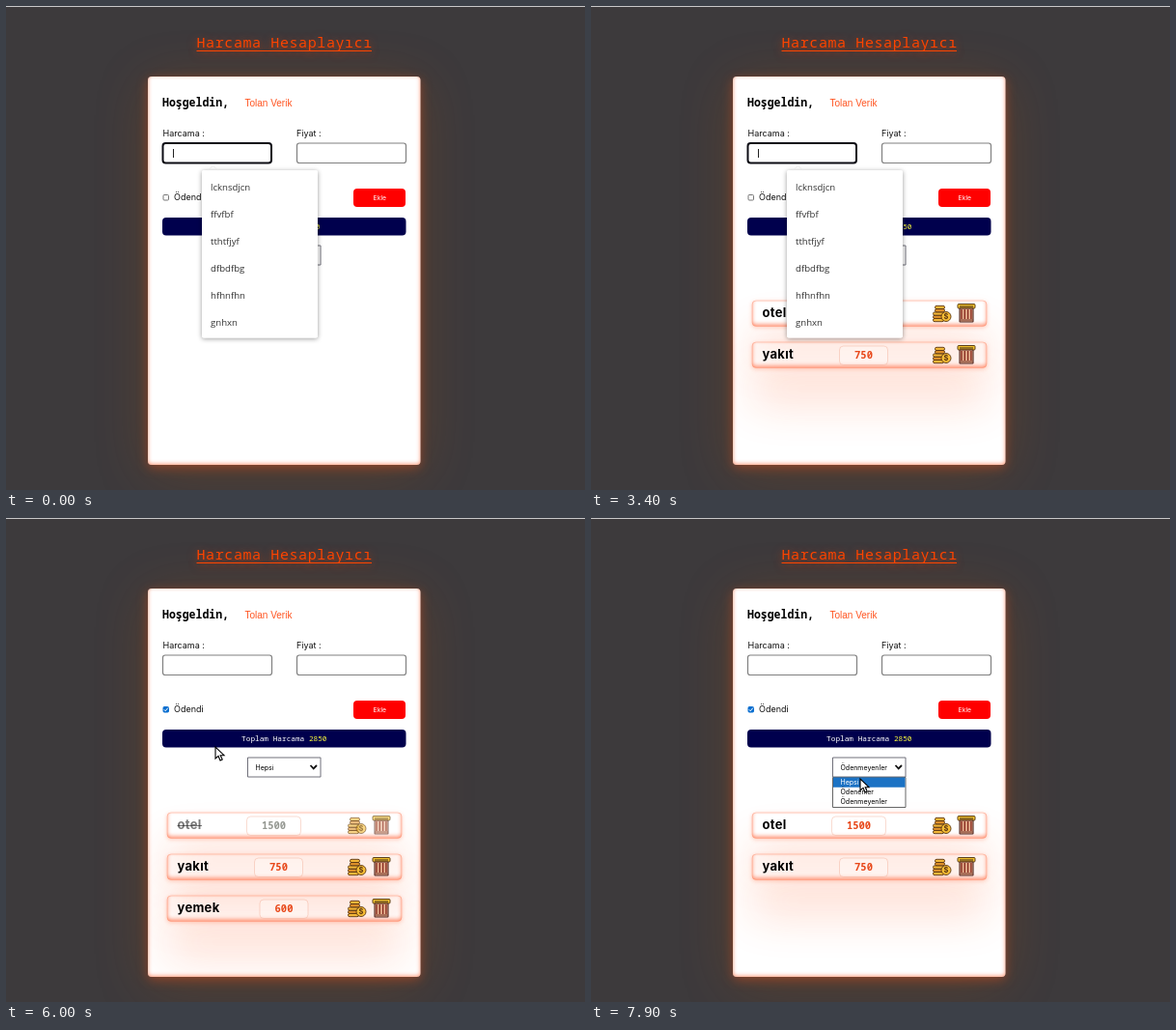
These frames come from a looping animation (600x501 px, 8000 ms). An HTML page with a canvas:

```html
<!DOCTYPE html>
<html lang="tr">
<head>
<meta charset="utf-8">
<title>Harcama Hesaplayıcı</title>
<style>
  html, body { margin: 0; width: 100%; height: 100%; overflow: hidden; background: #3d3a3c; }
  canvas { display: block; }
</style>
</head>
<body>
<canvas id="stage" width="600" height="501"></canvas>
<script>
const c = document.getElementById('stage').getContext('2d');
const LOOP = 8000;
const MONO = '"Noto Sans Mono", "DejaVu Sans Mono", monospace';
const SANS = 'Inter, "Open Sans", sans-serif';
const ORANGE = '#ff4500';
const FILTERS = ['Hepsi', 'Ödenenler', 'Ödenmeyenler'];
const HINTS = ['lcknsdjcn', 'ffvfbf', 'tthtfjyf', 'dfbdfbg', 'hfhnfhn', 'gnhxn'];
// start = moment the first letter is typed
const ENTRIES = [
  { name: 'otel', price: 1500, start: 300, mid: 277.5 },
  { name: 'yakıt', price: 750, start: 1950, mid: 282.5 },
  { name: 'yemek', price: 600, start: 3600, mid: 288 }
];

// Pointer path: time, x, y, and whether it hides until the next stop
const path = [];
for (const { start } of ENTRIES) {
  path.push([start + 900, 405, 153], [start + 1100, 395, 197],
            [start + 1250, 395, 197], [start + 1380, 209, 153, true]);
}
path.splice(-2);
path.push(
  [5050, 395, 197], [5300, 364, 318], [5400, 364, 318], [5650, 166, 199], [5800, 166, 199],
  [6000, 217, 237], [6200, 364, 318], [6280, 364, 318], [6390, 364, 404], [6450, 364, 404],
  [6600, 290, 258], [6680, 290, 258], [6860, 285, 283], [7000, 287, 281], [7200, 290, 258],
  [7280, 290, 258], [7450, 280, 293], [7520, 280, 293], [7680, 290, 258], [7760, 290, 258],
  [7900, 279, 270], [8000, 279, 270]);

function pointer(t) {
  const i = path.findIndex((p, k) => t >= p[0] && k + 1 < path.length && t < path[k + 1][0]);
  if (i < 0 || path[i][3]) return null;
  const [a, x, y] = path[i], [b, x2, y2] = path[i + 1];
  const k = (t - a) / (b - a), e = k * k * (3 - 2 * k);
  return { x: x + (x2 - x) * e, y: y + (y2 - y) * e };
}

const typed = (text, time, step) => String(text).slice(0, Math.max(0, Math.floor(time / step) + 1));

function stateAt(t) {
  const s = { name: '', price: '', focus: '', popup: false, cards: [], filter: 0 };
  ENTRIES.forEach((e, i) => {
    const u = t - e.start;
    if (u >= 1200) s.cards.push({ ...e, paid: false });
    else if (u >= (i ? -270 : -300)) {
      s.name = typed(e.name, u, 80);
      s.price = typed(e.price, u - 600, 90);
      s.focus = u >= 450 ? 'price' : 'name';
      s.popup = u < 0;
    }
  });
  s.total = s.cards.reduce((sum, e) => sum + e.price, 0);
  if (s.cards[0]) s.cards[0].paid = t >= 5350 && t < 6250;
  if (s.cards[2]) s.cards[2].paid = t >= 6420;
  s.checked = t >= 5750;
  s.open = (t >= 6640 && t < 6900) || (t >= 7240 && t < 7490) || t >= 7720;
  s.selected = t >= 6640;
  s.filter = t >= 7490 ? 2 : t >= 6900 ? 1 : 0;
  s.cards = s.cards.filter(e => !s.filter || e.paid === (s.filter === 1));
  s.mouse = pointer(t);
  return s;
}

function text(str, x, y, font, color, spacing = 0, align = 'left') {
  c.font = font;
  c.letterSpacing = spacing + 'px';
  c.textAlign = align;
  c.fillStyle = color;
  c.fillText(str, x, y);
}

function box(x, y, w, h, r, fill, stroke, line = 1) {
  c.beginPath();
  c.roundRect(x, y, w, h, r);
  if (fill) { c.fillStyle = fill; c.fill(); }
  if (stroke) { c.strokeStyle = stroke; c.lineWidth = line; c.stroke(); }
}

// Shadow alone, outside or inside a rounded box
function shadow([x, y, w, h, r], dy, blur, color, inside) {
  c.save();
  c.beginPath();
  if (!inside) c.rect(0, 0, 600, 501);
  c.roundRect(x, y, w, h, r);
  c.clip('evenodd');
  c.shadowColor = color;
  c.shadowBlur = blur;
  c.shadowOffsetX = 2000;
  c.shadowOffsetY = dy;
  c.fillStyle = '#000';
  c.beginPath();
  if (inside) c.rect(x - 2100, y - 100, w + 200, h + 200);
  c.roundRect(x - 2000, y, w, h, r);
  c.fill('evenodd');
  c.restore();
}

function line(points, color, width) {
  c.beginPath();
  points.forEach(p => c.lineTo(...p));
  c.strokeStyle = color;
  c.lineWidth = width;
  c.stroke();
}

function input(x, value, focused) {
  if (focused) box(x + .5, 142, 112.5, 20.5, 3, '#fff', '#0c0c14', 2);
  else box(x + .5, 142, 113, 20.5, 2.5, '#fff', '#808080', 1.2);
  text(value, x + 11, 155, '7px ' + SANS, '#111');
  if (focused) {
    const end = x + 11.5 + c.measureText(value).width;
    line([[end, 148], [end, 157]], '#222', 1);
  }
}

function coins(x, y) {
  const edge = '#5a3510';
  for (let i = 0; i < 5; i++) {
    box(x + (i < 3 ? 0 : 2), y + 14.5 - i * 3.3, i < 3 ? 11 : 10, 3.2, 1.5, i % 2 ? '#e2932b' : '#f3b738', edge, .9);
  }
  c.beginPath();
  c.arc(x + 13.5, y + 12.5, 5, 0, 7);
  c.fillStyle = '#f6bd35';
  c.fill();
  c.strokeStyle = edge;
  c.stroke();
  text('$', x + 13.5, y + 15.2, 'bold 7.5px ' + SANS, edge, 0, 'center');
}

function cashMachine(x, y) {
  box(x + .5, y + .5, 18, 4.5, 1, '#f0c02e', '#5d4018', 1);
  line([[x + 2.5, y + 3], [x + 16.5, y + 3]], '#3a2418', 1.2);
  box(x + 2.5, y + 5, 14, 14, .5, '#e8b491', '#4c211c', 1.1);
  for (let i = 0; i < 4; i++) line([[x + 4.5 + i * 3.3, y + 6], [x + 4.5 + i * 3.3, y + 16]], '#8a3024', 1.5);
  line([[x + 3, y + 17], [x + 16, y + 17]], '#6b2a20', 1);
}

function card(e, i) {
  const y = 305 + i * 43, b = [167, y, 243, 26.5, 4];
  shadow(b, 35, 46, 'rgba(255,80,20,.23)');
  shadow(b, 1, 4, 'rgba(255,80,30,.3)');
  shadow(b, -2, 4, 'rgba(255,75,25,.6)', true);
  box(...b, null, 'rgba(255,120,80,.3)', 1);
  box(e.mid - (e.price > 999 ? 28 : 25), y + 4, e.price > 999 ? 56 : 50, 19.5, 4, 'rgba(255,255,255,.25)', 'rgba(240,165,140,.4)', 1);
  c.save();
  if (e.paid) c.globalAlpha = .6;
  text(e.name, 177.5, y + 17.3, 'bold 13px ' + SANS, e.paid ? '#222' : '#000', .3);
  if (e.paid) line([[177.5, y + 13.5], [178 + c.measureText(e.name).width, y + 13.5]], '#222', 1);
  text(e.price, e.mid, y + 17, 'bold 10.5px ' + MONO, e.paid ? '#4f544a' : '#e8481a', 0, 'center');
  coins(354.5, y + 4);
  cashMachine(379.5, y + 3);
  c.restore();
}

function select(s) {
  const focused = s.selected && !s.open;
  box(250.5, 248, 75.5, 20, focused ? 2.5 : 0, '#fff', focused ? '#111' : '#70707a', focused ? 2 : 1);
  text(FILTERS[s.filter], 258.5, 260.5, '7px ' + SANS, '#000');
  line([[315.5, 256], [318.7, 259.4], [322, 256]], '#111', 1.8);
}

function options(s) {
  box(250.5, 268.5, 75.5, 31, 0, '#fff', '#666', 1);
  const row = Math.floor((s.mouse.y - 268) / 10.4);
  const active = FILTERS[row] ? row : s.filter;
  FILTERS.forEach((label, i) => {
    if (i === active) box(251, 268.5 + i * 10.3, 74.5, 10.3, 0, '#1b72c4');
    text(label, 258.5, 276 + i * 10.2, '7px ' + SANS, i === active ? '#fff' : '#000');
  });
}

function popup() {
  const b = [203, 170, 120, 173.5, 2];
  shadow(b, 1, 5, 'rgba(0,0,0,.4)');
  box(...b, '#fff');
  line([[209, 170], [214.5, 165.5], [220, 170]], '#e8e8e8', .8);
  HINTS.forEach((h, i) => text(h, 212, 191 + i * 27.9, '9.6px "Open Sans", "Noto Sans", sans-serif', '#333'));
}

const ARROW = new Path2D('M0 0V12L3 9.4 5 14 7.2 13 5.2 8.7H9Z');
const HAND = new Path2D('M-1.5 1.5Q-1.5-.5 0-.5T1.5 1.5V6.5L3.5 6.3 4.5 7.2 6.5 7 7.5 8 9 8.4V12.4L7.5 15V17H1V15L-2 11-3.5 9Q-3 7.5-1.5 9Z');

const within = (m, x, y, w, h) => m && m.x >= x && m.x <= x + w && m.y >= y && m.y <= y + h;

function drawPointer(m, cards) {
  if (!m || within(m, 162, 142, 114, 21) || within(m, 301, 142, 114, 21)) return;
  const hand = within(m, 360, 189, 54, 19) || cards.some((e, i) => within(m, 354, 308 + i * 43, 46, 20));
  c.save();
  c.translate(m.x, m.y);
  c.fillStyle = '#fff';
  c.strokeStyle = '#000';
  c.lineWidth = 1.1;
  const shape = hand ? HAND : ARROW;
  c.fill(shape);
  c.stroke(shape);
  c.restore();
}

function draw(t) {
  const s = stateAt(t);
  c.fillStyle = '#3d3a3c';
  c.fillRect(0, 0, 600, 501);
  c.fillStyle = '#c9c8c9';
  c.fillRect(0, 0, 600, 1);

  c.save();
  c.shadowColor = 'rgba(255,69,0,.6)';
  c.shadowBlur = 10;
  c.shadowOffsetY = 2;
  text('Harcama Hesaplayıcı', 197.5, 43, '500 15px ' + MONO, ORANGE, .6);
  line([[197.5, 46.5], [379, 46.5]], ORANGE, 1);
  c.restore();

  const panel = [147, 73, 282.5, 402, 4];
  shadow(panel, 8, 56, 'rgba(190,85,0,.22)');
  shadow(panel, 3, 12, 'rgba(255,85,25,.38)');
  box(...panel, '#fff');
  shadow(panel, -1, 4, 'rgba(255,85,30,.6)', true);

  text('Hoşgeldin,', 162, 104, 'bold 11.5px ' + MONO, '#000');
  text('Tolan Verik', 247.5, 103.7, '10px "Liberation Sans", Arial, sans-serif', '#ff5420');
  text('Harcama :', 162.5, 135, '9px ' + SANS, '#111');
  text('Fiyat :', 301, 135, '9px ' + SANS, '#111');
  input(162, s.name, s.focus === 'name');
  input(301, s.price, s.focus === 'price');
  if (s.focus === 'price') {
    line([[398, 151], [399.8, 149.3], [401.6, 151]], '#555', 1);
    line([[398, 153.5], [399.8, 155.2], [401.6, 153.5]], '#555', 1);
  }

  box(163, 195.5, 5.5, 5.5, 1, s.checked ? '#0b6fd0' : '#fff', s.checked ? '#0b6fd0' : '#777', 1);
  if (s.checked) line([[163.8, 198.3], [165.2, 199.8], [167.8, 196.6]], '#fff', 1);
  text('Ödendi', 174, 201, '9px ' + SANS, '#111');

  const hover = within(s.mouse, 360, 189, 54, 19);
  const button = hover ? [361, 189.5, 52, 18, 4] : [360, 189, 54, 19, 4];
  if (hover) shadow(button, 0, 8, 'rgba(255,0,0,.75)');
  box(...button, '#f00');
  text('Ekle', 387.3, 201, '6.8px ' + SANS, '#fff', 0, 'center');

  box(162, 219, 252.5, 18.5, 4, '#00004d');
  const label = 'Toplam Harcama ', font = '7.75px ' + MONO;
  c.font = font;
  c.letterSpacing = '0px';
  const left = 288.3 - c.measureText(label + s.total).width / 2;
  text(label, left, 231, font, '#fff');
  text(s.total, left + c.measureText(label).width, 231, font, '#ffff3c');

  select(s);
  c.save();
  c.beginPath();
  c.roundRect(...panel);
  c.clip();
  s.cards.forEach(card);
  c.restore();
  if (s.open) options(s);
  if (s.popup) popup();
  drawPointer(s.mouse, s.cards);
}

const began = performance.now();
function tick() {
  draw((performance.now() - began) % LOOP);
  requestAnimationFrame(tick);
}
tick();
</script>
</body>
</html>
```
